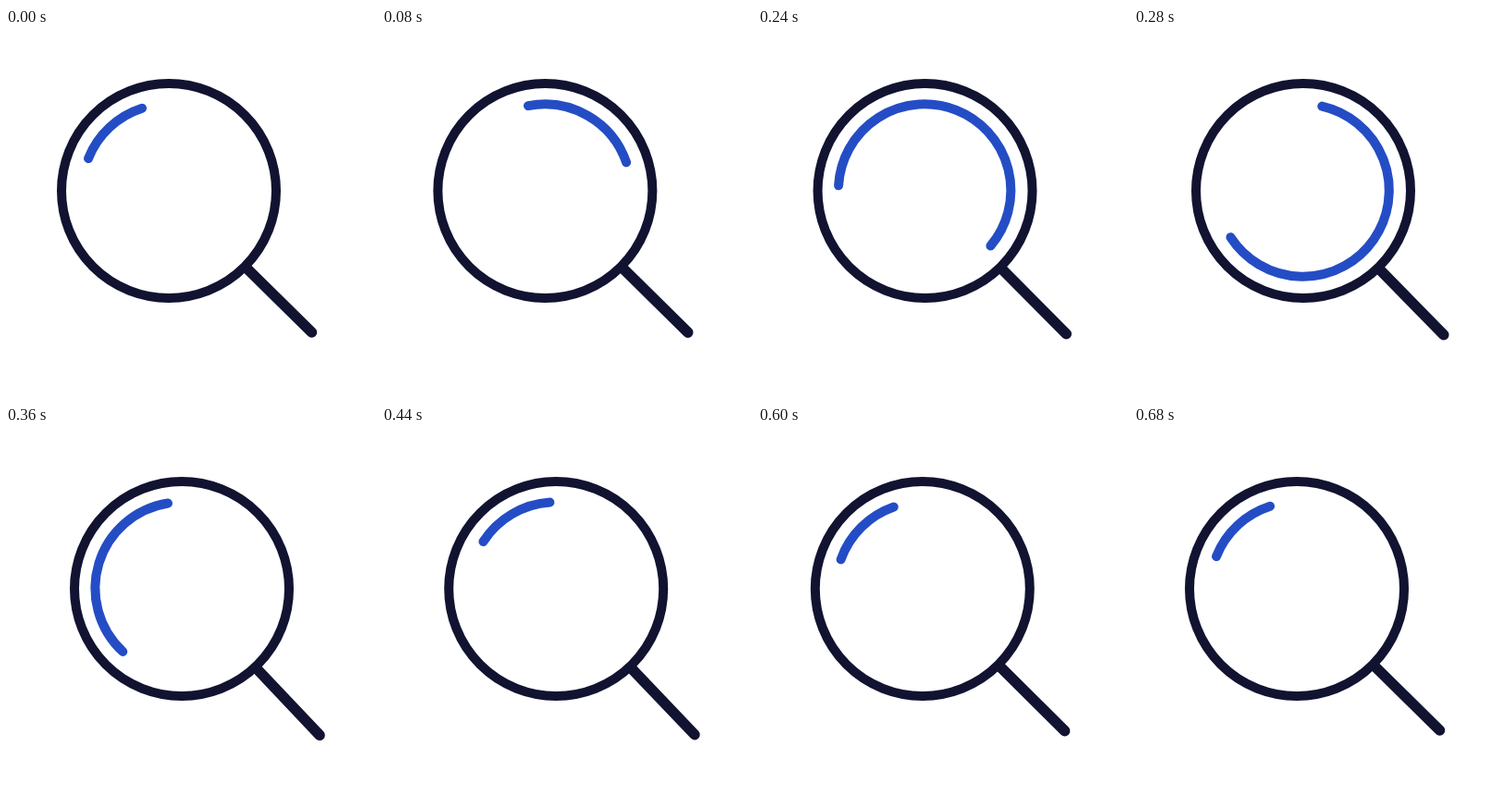
Animation, 400 px wide and 400 px high, one loop 1220 ms. Source, as an HTML page:

```html
<!DOCTYPE html>
<html lang="en">
<head>
<meta charset="utf-8">
<title>Search icon</title>
<style>
  html, body { margin: 0; width: 100%; height: 100%; overflow: hidden; background: #fff; }
  svg { display: block; width: 100%; height: 100%; }
</style>
</head>
<body>
<svg viewBox="0 0 400 400" fill="none" stroke-linecap="round">
  <g id="lens" stroke="#121331">
    <path id="handle" d="M84 83.5L154.5 153" stroke-width="11.5"/>
    <circle r="116" stroke-width="10"/>
    <path id="glint" stroke="#244dc5" stroke-width="10"/>
  </g>
</svg>
<script>
  const LOOP = 1220, STEP = 40, END = 680;
  const lens = document.getElementById('lens');
  const handle = document.getElementById('handle');
  const glint = document.getElementById('glint');

  // Smooth curve through [time, value] points, without overshoot.
  function curve(points) {
    const slope = i => (points[i + 1][1] - points[i][1]) / (points[i + 1][0] - points[i][0]);
    const tangents = points.map((p, i) => {
      if (i === 0 || i === points.length - 1) return 0;
      const a = slope(i - 1), b = slope(i);
      return a * b > 0 ? 2 * a * b / (a + b) : 0;
    });
    return t => {
      let i = 0;
      while (i < points.length - 2 && t > points[i + 1][0]) i++;
      const [t0, v0] = points[i], [t1, v1] = points[i + 1];
      const h = t1 - t0, u = (t - t0) / h, w = 1 - u;
      return v0 * w * w * (1 + 2 * u) + v1 * u * u * (3 - 2 * u)
        + h * u * w * (tangents[i] * w - tangents[i + 1] * u);
    };
  }

  const shift = curve([[0, 0], [160, 1.3], [280, 7], [360, 14], [440, 12.2], [520, 6.1], [560, 3.4], [END, 0]]);
  // Both glint ends make two clockwise turns, in degrees.
  const tail = curve([[0, 201.7], [160, 374.3], [280, 642.8], [360, 852.8], [440, 932.8], [520, 917.4], [END, 921.7]]);
  const head = curve([[0, 252.2], [160, 514.2], [280, 867], [360, 981], [440, 986.1], [520, 969.4], [END, 972.2]]);

  function onArc(deg) {
    const a = deg * Math.PI / 180;
    return `${(93.2 * Math.cos(a) - 0.4).toFixed(2)} ${(93.2 * Math.sin(a) - 0.5).toFixed(2)}`;
  }

  function draw(ms) {
    const t = Math.min(END, Math.floor((ms % LOOP) / STEP) * STEP);
    const x = shift(t), from = tail(t), to = head(t);
    lens.setAttribute('transform', `translate(${176 + x} 176)`);
    handle.setAttribute('transform', `rotate(${x / 7})`);
    glint.setAttribute('d', `M${onArc(from)}A93.2 93.2 0 ${to - from > 180 ? 1 : 0} 1 ${onArc(to)}`);
  }

  let start;
  function tick(now) {
    start ??= now;
    draw(Math.max(0, now - start));
    requestAnimationFrame(tick);
  }
  draw(0);
  requestAnimationFrame(tick);
</script>
</body>
</html>
```
